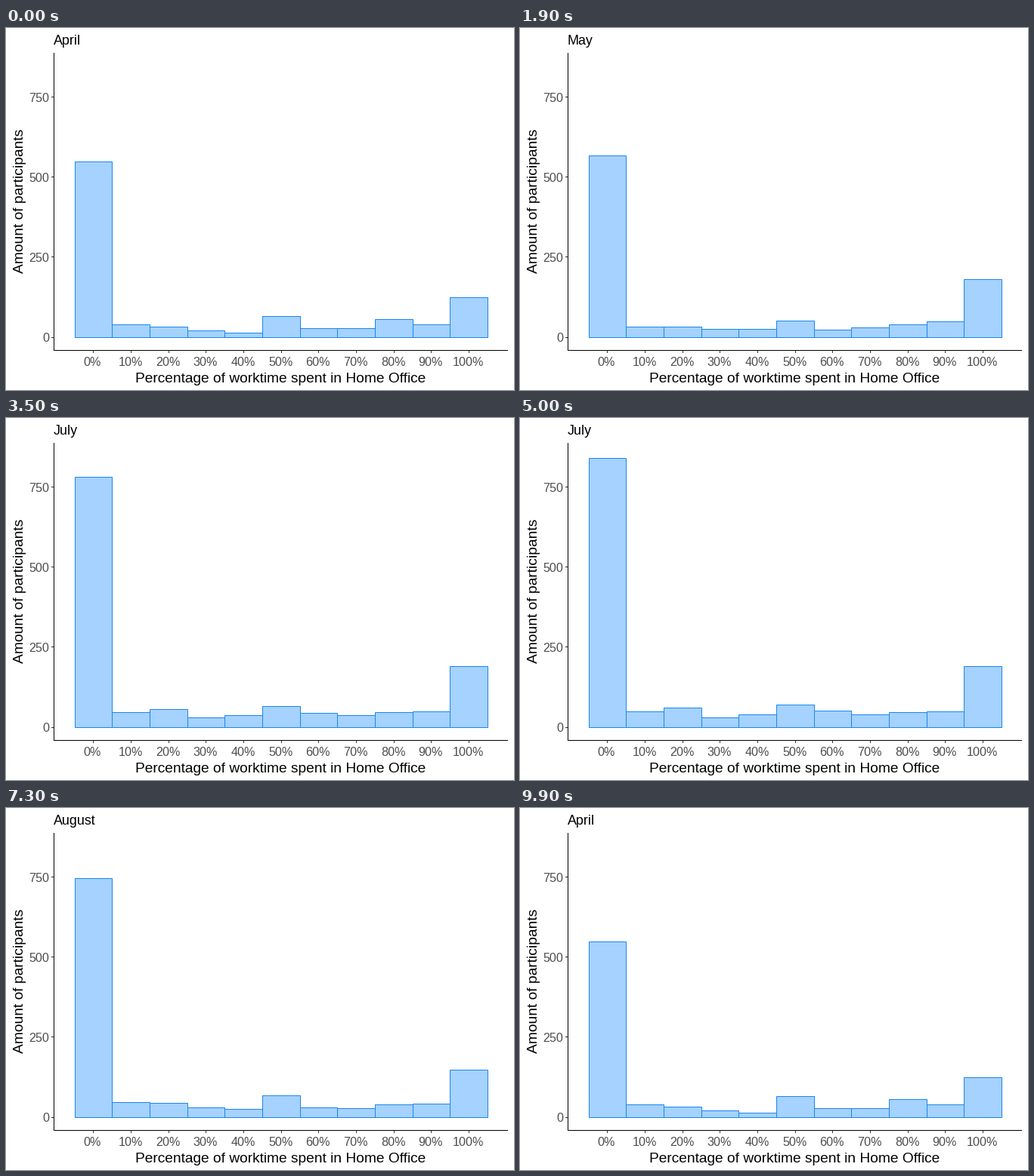
Recreate the animation shown at these times as a matplotlib script. Size 672 px wide and 480 px high, loop 10 s.

```python
import matplotlib.pyplot as plt
import numpy as np
from matplotlib.animation import FuncAnimation
from matplotlib.patches import Rectangle

plt.rcParams["font.family"] = ["Liberation Sans", "DejaVu Sans"]

W, H, DPI = 672, 480, 96
FRAMES, INTERVAL = 100, 100
PX = 72 / DPI                      # one pixel in points

MONTHS = ["April", "May", "July", "August", "September"]
COUNTS = np.array([
    [548, 39, 32, 20, 13, 65, 27, 27, 56, 39, 124],
    [567, 32, 32, 25, 25, 51, 22, 30, 39, 48, 180],
    [846, 49, 61, 30, 39, 70, 51, 39, 47, 48, 192],
    [748, 50, 45, 30, 24, 65, 31, 29, 40, 43, 151],
    [744, 39, 41, 29, 26, 71, 27, 24, 37, 39, 142],
], dtype=float)
HOLD, MOVE = 7, 13                 # frames at rest, frames in transition

ZERO, SCALE = 409.5285, 0.4242     # y of count 0, pixels per participant
LEFT, BAR = 90.62, 49.66           # first bar edge, bar width
AXIS_X, AXIS_Y, TOP, RIGHT = 63, 427, 33, 664


def pixel(v):
    return int(np.floor(v + 0.5))


def row(count):
    return pixel(ZERO - SCALE * count)


def edge(k):
    return pixel(LEFT + BAR * k)


def ease(t):
    """Cubic in-out."""
    return 4 * t ** 3 if t < 0.5 else 1 - 4 * (1 - t) ** 3


def state(frame):
    """Bar counts and title at a frame."""
    i, step = divmod(frame, HOLD + MOVE)
    j = (i + 1) % len(MONTHS)
    t = max(0, step - HOLD) / MOVE
    counts = COUNTS[i] + (COUNTS[j] - COUNTS[i]) * ease(t)
    return counts, MONTHS[j if t > 0.5 else i]


fig = plt.figure(figsize=(W / DPI, H / DPI), dpi=DPI, facecolor="white")
ax = fig.add_axes([0, 0, 1, 1])
ax.set_xlim(0, W)
ax.set_ylim(H, 0)
ax.axis("off")


def block(x, y, w, h, color):
    ax.add_patch(Rectangle((x, y), w, h, fc=color, ec="none", lw=0))


def label(x, y, text, size, color="black", **kw):
    return ax.text(x, y, text, fontsize=size, color=color, va="baseline", **kw)


bars = []
for k in range(COUNTS.shape[1]):
    bar = Rectangle((0, 0), 1, 1, fc="#A5D2FF", ec="#1C86EE", lw=PX,
                    joinstyle="miter", snap=False)
    bars.append(ax.add_patch(bar))

# axes, ticks and labels
block(AXIS_X, TOP, 1, AXIS_Y - TOP + 1, "black")
block(AXIS_X, AXIS_Y, RIGHT - AXIS_X, 1, "black")
for value in range(0, 751, 250):
    y = row(value)
    block(AXIS_X - 3, y, 3, 1, "#333333")
    label(57.2, ZERO - SCALE * value + 6.5, str(value), 12.1, "#4D4D4D",
          ha="right")
for k in range(11):
    x = edge(k + 0.5)
    block(x, AXIS_Y + 1, 1, 3, "#333333")
    label(x - 0.5, 448, f"{10 * k}%", 12.1, "#4D4D4D", ha="center")

label(363.5, 470, "Percentage of worktime spent in Home Office", 14.3,
      ha="center")
label(23, 229.7, "Amount of participants", 14.4, ha="center",
      rotation=90, rotation_mode="anchor")
title = label(62.7, 22, "", 13.4, ha="left")


def update(frame):
    counts, month = state(frame)
    base = row(0)
    for k, (bar, count) in enumerate(zip(bars, counts)):
        x, y = edge(k), row(count)
        bar.set_bounds(x + 0.5, y + 0.5, edge(k + 1) - x, base - y)
    title.set_text(month)
    return [*bars, title]


anim = FuncAnimation(fig, update, frames=FRAMES, interval=INTERVAL,
                     init_func=lambda: update(0), repeat=True,
                     repeat_delay=0, blit=False)
plt.show()
```
